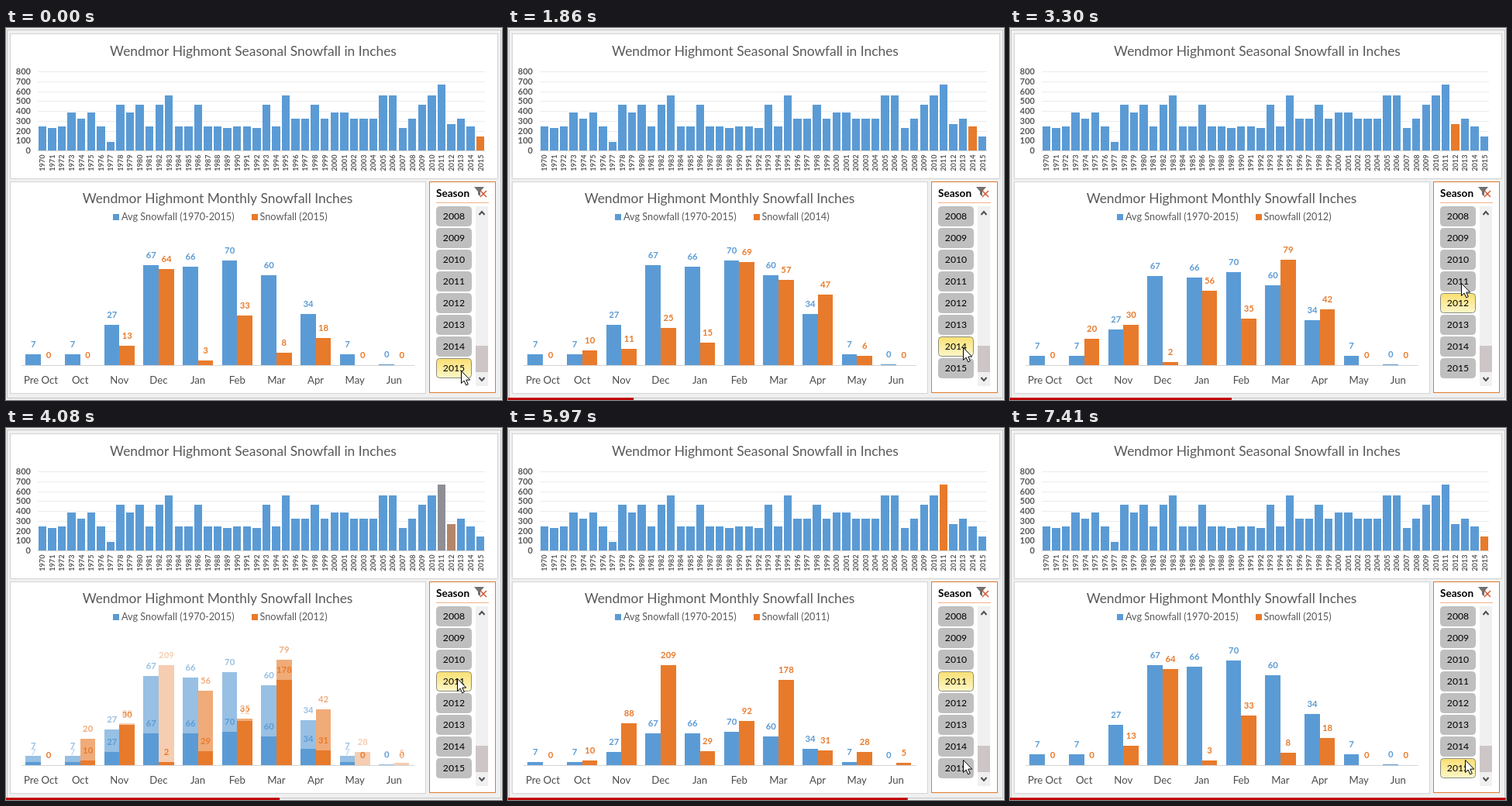
Recreate the animation shown at these times as an HTML page with a canvas. Size 640x480 px, loop 7.44 s.

```html
<!DOCTYPE html>
<html lang="en">
<head>
<meta charset="utf-8">
<title>Snowfall dashboard</title>
<style>
html, body { margin: 0; width: 100%; height: 100%; overflow: hidden; background: #f0f0f0; }
canvas { display: block; width: 640px; height: 480px; }
</style>
</head>
<body>
<canvas id="stage" width="640" height="480"></canvas>
<script>
const LOOP = 7440;
const BLUE = '#5b9bd5', ORANGE = '#e87a2b', GREY = '#595959';
const PLACE = 'Wendmor Highmont';
const FONT = 'Lato, Carlito, sans-serif';

// Monthly inches; months left out at the end had no snow
const MONTHS = ['Pre Oct', 'Oct', 'Nov', 'Dec', 'Jan', 'Feb', 'Mar', 'Apr', 'May', 'Jun'];
const AVERAGE = [7, 7, 27, 67, 66, 70, 60, 34, 7, 0.4];
const SEASONS = {
  2011: [0, 10, 88, 209, 29, 92, 178, 31, 28, 5],
  2012: [0, 20, 30, 2, 56, 35, 79, 42],
  2014: [0, 10, 11, 25, 15, 69, 57, 47, 6],
  2015: [0, 0, 13, 64, 3, 33, 8, 18]
};

// Years that stand out from the usual dry level
const LEVELS = [
  { inches: 88, years: [1977] },
  { inches: 325, years: [1974, 1996, 1997, 1999, 2002, 2003, 2004, 2008, 2013] },
  { inches: 382, years: [1973, 1975, 1979, 2000, 2001] },
  { inches: 465, years: [1978, 1980, 1982, 1986, 1993, 1998, 2009] },
  { inches: 555, years: [1983, 1995, 2005, 2006, 2010] }
];

// The pointer sets off at `move`, presses shortly before `fade`
const PICKS = [
  { year: 2014, move: 585, fade: 1365, x: 587, y: 412 },
  { year: 2012, move: 2280, fade: 2670, x: 580, y: 353 },
  { year: 2011, move: 3100, fade: 3970, x: 582, y: 323 },
  { year: 2015, move: 5305, fade: 6340, x: 587, y: 428 }
];
const FIRST = { year: 2015, x: 587, y: 442 };
const TRAVEL = 500, WAIT = 250, FADE = 300;

const ctx = document.getElementById('stage').getContext('2d');
const clamp = v => Math.min(1, Math.max(0, v));
const easeOut = k => 1 - (1 - k) ** 3;

function seasonTotal(year) {
  if (SEASONS[year]) return SEASONS[year].reduce((sum, v) => sum + v);
  const level = LEVELS.find(l => l.years.includes(year));
  const wobble = 10 * Math.sin(year * 2.1);
  return level ? level.inches : 236 + wobble;
}

function axisMax(values) {
  const top = Math.max(...values) * 1.05;
  const step = top > 100 ? 50 : 10;
  return Math.ceil(top / step) * step;
}

function box(c, x, y, w, h, fill) {
  c.fillStyle = fill;
  c.fillRect(x, y, w, h);
}

// Bar with edges on whole pixels
function bar(c, left, right, base, h, fill) {
  const x = Math.round(left);
  box(c, x, base - h, Math.round(right) - x, h, fill);
}

function panel(c, x, y, w, h, line) {
  box(c, x, y, w, h, '#fff');
  c.strokeStyle = line;
  c.lineWidth = 1;
  c.strokeRect(x + 0.5, y + 0.5, w - 1, h - 1);
}

// Text placed by the vertical middle of its capitals
function label(c, str, x, cy, size, color, align = 'center', weight = 400) {
  c.font = `${weight} ${size}px ${FONT}`;
  c.textAlign = align;
  c.fillStyle = color;
  c.fillText(str, x, cy + size * 0.36);
}

function poly(c, points) {
  c.beginPath();
  points.forEach(([x, y]) => c.lineTo(x, y));
  c.closePath();
}

function line(c, points, color, width) {
  c.beginPath();
  points.forEach(([x, y], i) => i ? c.lineTo(x, y) : c.moveTo(x, y));
  c.strokeStyle = color;
  c.lineWidth = width;
  c.stroke();
}

function drawSeasonal(c, selected) {
  const base = 158, unit = 0.1275;
  panel(c, 5, 7, 630, 188, '#d4d4d4');
  label(c, PLACE + ' Seasonal Snowfall in Inches', 319, 29.5, 17.4, GREY);
  for (let v = 0; v <= 800; v += 100) {
    const y = Math.round(base - v * unit);
    box(c, 41, y, 577, 1, v ? '#ececec' : '#d4d4d4');
    label(c, v, 32, y + 0.5, 11, GREY, 'right', 700);
  }
  for (let year = 1970; year <= 2015; year++) {
    const x = 47 + (year - 1970) * 12.56;
    const h = Math.round(seasonTotal(year) * unit);
    bar(c, x - 5.2, x + 5.2, base, h, year === selected ? ORANGE : BLUE);
    c.save();
    c.translate(x, 163.5);
    c.rotate(-Math.PI / 2);
    label(c, year, 0, 0, 9.2, GREY, 'right', 700);
    c.restore();
  }
}

function drawMonthly(c, year) {
  const base = 435, snow = SEASONS[year];
  const unit = 154.4 / axisMax([...AVERAGE, ...snow]);
  panel(c, 5, 198, 537, 274, '#d4d4d4');
  label(c, PLACE + ' Monthly Snowfall Inches', 273, 220, 17.4, GREY);
  box(c, 138, 240, 8, 8, BLUE);
  label(c, 'Avg Snowfall (1970-2015)', 149, 243, 12.7, GREY, 'left');
  box(c, 317, 240, 8, 8, ORANGE);
  label(c, `Snowfall (${year})`, 327.5, 243, 12.7, GREY, 'left');
  box(c, 20, base, 507, 1, '#d4d4d4');

  const valueBar = (value, left, color) => {
    const h = Math.ceil(value * unit - 0.4);
    bar(c, left, left + 19.6, base, h, color);
    label(c, Math.round(value), left + 10, base - h - 13, 11.3, color, 'center', 700);
  };
  MONTHS.forEach((name, i) => {
    const x = 45 + i * 50.65;
    valueBar(AVERAGE[i], x - 19.6, BLUE);
    valueBar(snow[i] || 0, x, ORANGE);
    label(c, name, x, 454, 13.2, '#4c4c4c');
  });
}

const charts = {};
for (const key of Object.keys(SEASONS)) {
  const layer = document.createElement('canvas');
  layer.width = 640;
  layer.height = 480;
  const c = layer.getContext('2d');
  drawSeasonal(c, +key);
  drawMonthly(c, +key);
  charts[key] = layer;
}

function drawCharts(t) {
  ctx.drawImage(charts[FIRST.year], 0, 0);
  for (const pick of PICKS) {
    ctx.globalAlpha = clamp((t - pick.fade) / FADE);
    ctx.drawImage(charts[pick.year], 0, 0);
  }
  ctx.globalAlpha = 1;
}

function chevron(cy, dir) {
  line(ctx, [[610.5, cy + 2 * dir], [614, cy - 2 * dir], [617.5, cy + 2 * dir]], '#505050', 2);
}

function drawFilterIcon() {
  poly(ctx, [[604, 205], [617, 205], [612, 211], [612, 217], [609, 215], [609, 211]]);
  ctx.fillStyle = '#707070';
  ctx.fill();
  line(ctx, [[612, 210], [620, 218]], '#d9512c', 1.5);
  line(ctx, [[620, 210], [612, 218]], '#d9512c', 1.5);
}

function drawButton(year, y, selected) {
  let fill = '#c0bfc0';
  if (selected) {
    fill = ctx.createLinearGradient(0, y, 0, y + 26);
    fill.addColorStop(0, '#f9df70');
    fill.addColorStop(1, '#fdf7cb');
  }
  ctx.beginPath();
  ctx.roundRect(555.5, y + 0.5, 45, 25, 4);
  ctx.fillStyle = fill;
  ctx.strokeStyle = selected ? '#8c8c80' : fill;
  ctx.lineWidth = 1;
  ctx.fill();
  ctx.stroke();
  label(ctx, year, 578, y + 13, 12.2, '#000');
}

function drawSlicer(t) {
  let selected = FIRST.year;
  for (const pick of PICKS) if (t >= pick.fade - WAIT) selected = pick.year;

  panel(ctx, 546, 198, 86, 273, '#e07b2f');
  label(ctx, 'Season', 555, 213, 13.6, '#000', 'left', 700);
  drawFilterIcon();
  box(ctx, 555, 225, 68, 1, '#eeb48a');

  box(ctx, 606, 230, 16, 232, '#f0f0f0');
  box(ctx, 606, 410, 16, 34, '#cdc5c6');
  chevron(239, 1);
  chevron(453, -1);
  for (let i = 0; i < 8; i++) drawButton(2008 + i, 230 + i * 28, 2008 + i === selected);
}

function drawBusy(x, y, t) {
  const turn = t / 120;
  const ring = (from, to, color) => {
    ctx.beginPath();
    ctx.arc(x, y, 6.5, from, to);
    ctx.strokeStyle = color;
    ctx.lineWidth = 5;
    ctx.stroke();
  };
  ctx.beginPath();
  ctx.arc(x, y, 5, 0, Math.PI * 2);
  ctx.fillStyle = '#d8ecf8';
  ctx.fill();
  ring(0, Math.PI * 2, '#1f86dc');
  ring(turn, turn + 1.2, '#55b4f0');
}

function drawArrow(x, y) {
  ctx.save();
  ctx.translate(x + 0.5, y + 0.5);
  poly(ctx, [[0, 0], [0, 16], [3.6, 12.6], [6.2, 18.4], [8.8, 17.2], [6.3, 11.6], [11.2, 11.6]]);
  ctx.fillStyle = '#fff';
  ctx.fill();
  ctx.strokeStyle = '#000';
  ctx.lineWidth = 1;
  ctx.stroke();
  ctx.restore();
}

function drawPointer(t) {
  let { x, y } = FIRST, busy = false;
  for (const pick of PICKS) {
    const k = easeOut(clamp((t - pick.move) / TRAVEL));
    x += (pick.x - x) * k;
    y += (pick.y - y) * k;
    busy = busy || (t >= pick.fade - WAIT && t < pick.fade);
  }
  (busy ? drawBusy : drawArrow)(Math.round(x), Math.round(y), t);
}

function draw(t) {
  box(ctx, 0, 0, 640, 480, '#f0f0f0');
  ctx.strokeStyle = '#c4c4c4';
  ctx.lineWidth = 1;
  ctx.strokeRect(1.5, 2.5, 637, 475);
  drawCharts(t);
  drawSlicer(t);
  drawPointer(t);
  if (t >= 30) box(ctx, 0, 477, 640 * (t + 25) / LOOP, 3, '#c00000');
}

let start;
function tick(now) {
  if (start === undefined) start = now;
  const t = (now - start) % LOOP;
  draw(Math.floor(t / 30) * 30);
  requestAnimationFrame(tick);
}
requestAnimationFrame(tick);
</script>
</body>
</html>
```
